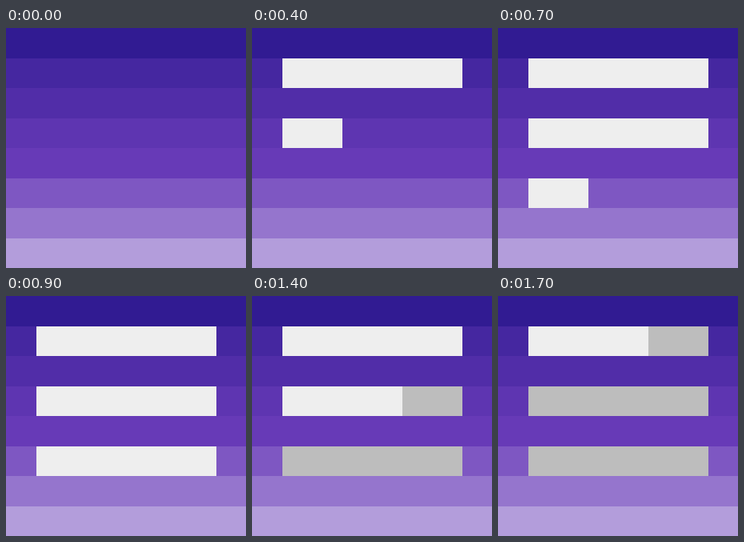
An HTML page with a canvas that plays this animation: 300x300 px, repeating every 3 s.

```html
<!DOCTYPE html>
<html lang="en">
<head>
<meta charset="utf-8">
<title>Filling bars</title>
<style>
  html, body { margin: 0; width: 100%; height: 100%; overflow: hidden; }
  canvas { display: block; }
</style>
</head>
<body>
<canvas id="stage" width="300" height="300"></canvas>
<script>
const ctx = document.getElementById('stage').getContext('2d');
const LOOP = 3000, STEP = 100, CELL = 37.5, BLOCKS = 9;
const BANDS = ['#311b92', '#4527a0', '#512da8', '#5e35b1',
               '#673ab7', '#7e57c2', '#9575cd', '#b39ddb'];
const LIGHT = '#eeeeee', GRAY = '#bdbdbd';

// Fills a rectangle given in grid cells, snapped to whole pixels.
function fillCells(col, row, cols, color) {
  const x = Math.round(col * CELL), y = Math.round(row * CELL);
  ctx.fillStyle = color;
  ctx.fillRect(x, y, Math.round((col + cols) * CELL) - x,
                     Math.round((row + 1) * CELL) - y);
}

function draw(time) {
  const step = Math.floor(time % LOOP / STEP);
  const filled = Math.min(step, BLOCKS);
  const grayed = Math.min(Math.max(step - 10, 0), 7);

  BANDS.forEach((color, row) => fillCells(0, row, 8, color));
  // Blocks appear in reading order, then turn gray from the last one back.
  for (let i = 0; i < filled; i++) {
    const color = i >= BLOCKS - grayed ? GRAY : LIGHT;
    fillCells(1 + i % 3 * 2, 1 + Math.floor(i / 3) * 2, 2, color);
  }
}

const start = performance.now();
function tick() {
  draw(performance.now() - start);
  requestAnimationFrame(tick);
}
tick();
</script>
</body>
</html>
```
